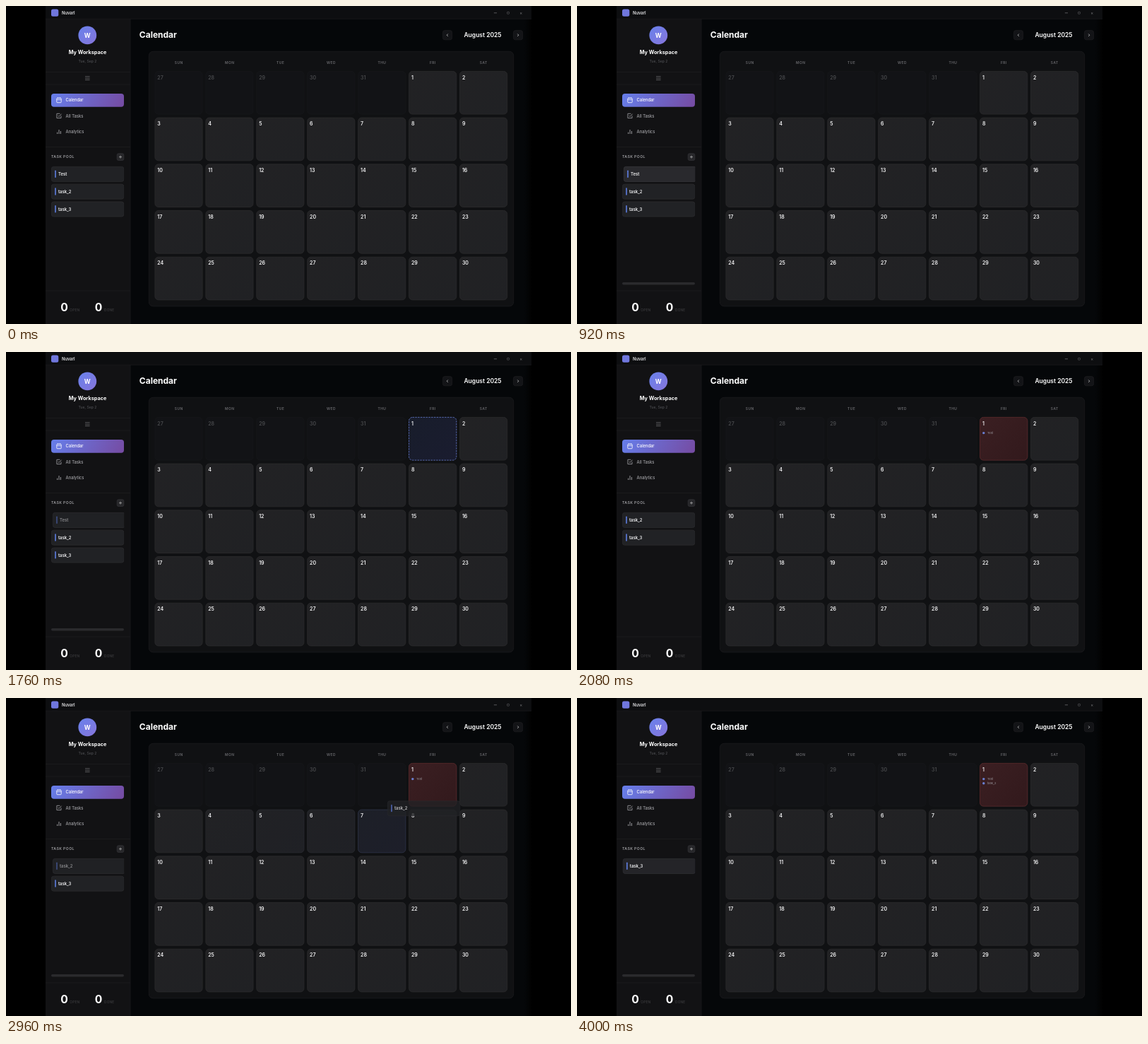
These frames come from a looping animation (800 by 450 pixels, 4.04 s). An HTML page with a canvas:

```html
<!DOCTYPE html>
<html lang="en">
<head>
<meta charset="utf-8">
<title>Calendar</title>
<style>
html, body { margin: 0; width: 100%; height: 100%; overflow: hidden; background: #000; }
canvas { display: block; width: 800px; height: 450px; }
</style>
</head>
<body>
<canvas width="800" height="450"></canvas>
<script>
const ctx = document.querySelector('canvas').getContext('2d');
const LOOP = 4040, FADE = 180;
const DAYS = ['SUN', 'MON', 'TUE', 'WED', 'THU', 'FRI', 'SAT'];
const TARGET = 5;

// Each drag: pointer path [ms, x, y], ghost offset, and the times of its stages.
const drags = [
  { name: 'Test', hover: 520, start: 1000, hide: 1720, leave: 1800, save: 1880, grab: 22,
    path: [[1000, 88, 238], [1160, 530, 170], [1320, 568, 156], [1480, 577, 128]] },
  { name: 'task_2', hover: 2300, start: 2680, hide: 3270, leave: 3290, save: 3420, grab: 36,
    path: [[2680, 100, 238], [2900, 560, 160], [3120, 645, 130], [3240, 612, 125]] },
  { name: 'task_3', hover: 3910, start: LOOP, save: LOOP }
];

const clamp = v => Math.max(0, Math.min(1, v));
const smooth = v => v * v * (3 - 2 * v);
const ramp = (t, from, length = 200) => smooth(clamp((t - from) / length));

function pointer(drag, t) {
  let [, x, y] = drag.path[0];
  for (let i = 1; i < drag.path.length; i++) {
    const [t0, x0, y0] = drag.path[i - 1], [t1, x1, y1] = drag.path[i];
    if (t >= t0) {
      const p = ramp(t, t0, t1 - t0);
      x = x0 + (x1 - x0) * p;
      y = y0 + (y1 - y0) * p;
    }
  }
  return [x, y];
}

const cellX = i => 210.5 + 71.93 * (i % 7);
const cellY = i => 92 + 65.7 * Math.floor(i / 7);

function cellUnder(t) {
  const drag = drags.find(d => d.path && t >= d.start && t < d.leave);
  if (!drag) return -1;
  const [x, y] = pointer(drag, t);
  for (let i = 0; i < 35; i++) {
    const dx = x - cellX(i), dy = y - cellY(i);
    if (dx >= 0 && dx <= 68 && dy >= 0 && dy <= 61.5) return i;
  }
  return -1;
}

function box(x, y, w, h, r, fill, stroke) {
  ctx.beginPath();
  ctx.roundRect(x, y, w, h, r);
  if (fill) { ctx.fillStyle = fill; ctx.fill(); }
  if (stroke) { ctx.strokeStyle = stroke; ctx.stroke(); }
}

function dot(x, y, r, fill) {
  ctx.beginPath();
  ctx.arc(x, y, r, 0, 7);
  ctx.fillStyle = fill;
  ctx.fill();
}

function text(str, x, y, size, color, weight = 500, align = 'left', spacing = 0) {
  ctx.font = `${weight} ${size}px Inter, sans-serif`;
  ctx.letterSpacing = spacing + 'px';
  ctx.textAlign = align;
  ctx.fillStyle = color;
  ctx.fillText(str, x, y);
}

function line(color, width, ...points) {
  ctx.beginPath();
  points.forEach(([x, y], i) => i ? ctx.lineTo(x, y) : ctx.moveTo(x, y));
  ctx.strokeStyle = color;
  ctx.lineWidth = width;
  ctx.stroke();
  ctx.lineWidth = .8;
}

function gradient(x0, y0, x1, y1, a, b) {
  const g = ctx.createLinearGradient(x0, y0, x1, y1);
  g.addColorStop(0, a);
  g.addColorStop(1, b);
  return g;
}

function withAlpha(alpha, draw) {
  ctx.save();
  ctx.globalAlpha *= alpha;
  draw();
  ctx.restore();
}

function taskCard(name, x, y, hover = 0) {
  box(x + .4, y + .4, 102.4, 21, 3, '#212225', '#2b2b2e');
  if (hover) withAlpha(hover, () => box(x + .4, y + .4, 102.4, 21, 3, '#29292d', '#343438'));
  box(x + 5.2, y + 5.5, 1.6, 10.5, .8, '#5f7fe4');
  text(name, x + 10, y + 13, 5.9, '#f1f1f3', 600);
}

function drawFrame() {
  ctx.fillStyle = '#000';
  ctx.fillRect(0, 0, 800, 450);
  ctx.fillStyle = '#050709';
  ctx.fillRect(56, 0, 680, 450);
  ctx.fillStyle = gradient(734, 0, 744, 0, '#050709', '#010101');
  ctx.fillRect(734, 0, 10, 450);
  ctx.fillStyle = '#121214';
  ctx.fillRect(56, 18, 120, 432);
  ctx.fillStyle = '#0d0e10';
  ctx.fillRect(56, 0, 688, 18);
  line('#1a1a1c', .8, [56, 18.3], [744, 18.3]);
  line('#1a1a1c', .8, [176, 18], [176, 450]);

  box(64, 4.5, 10.3, 10.3, 2.5, '#7077dd');
  text('Nuvarl', 79, 11.8, 5.8, '#e4e4e6', 600);
  line('#77777a', .7, [690.8, 9.8], [695, 9.8]);
  box(709.6, 8.4, 2.8, 2.8, .4, null, '#4f4f52');
  text('×', 729.3, 11.7, 6, '#77777a', 400, 'center');
}

function drawSidebar(t) {
  dot(115.3, 41.4, 12.9, gradient(105, 31, 126, 52, '#6b80ea', '#8476dc'));
  text('W', 115.3, 44.5, 8.6, '#fff', 700, 'center');
  text('My Workspace', 115.5, 67.6, 7.3, '#fff', 700, 'center');
  text('Tue, Sep 2', 115.5, 80.4, 5.15, '#56575b', 400, 'center');
  for (const y of [93.5, 111, 199.5, 403]) line('#1d1d1f', .8, [56, y], [176, y]);
  for (const y of [99.8, 102.2, 104.6]) line('#77777a', .7, [112, y], [118.6, y]);

  box(64, 124, 103, 18.8, 4, gradient(72, 110, 159, 157, '#667eea', '#764ba2'));
  const gray = '#a5a5a9';
  text('Calendar', 84.6, 135.1, 5.8, '#fff');
  text('All Tasks', 84.6, 157.5, 5.8, gray);
  text('Analytics', 84.6, 179.9, 5.8, gray);
  box(71.8, 130.3, 6.4, 6.4, .8, null, '#fff');
  line('#fff', .7, [71.8, 132.6], [78.2, 132.6]);
  line('#fff', .7, [73.6, 129.3], [73.6, 131]);
  line('#fff', .7, [76.4, 129.3], [76.4, 131]);
  line(gray, .8, [78, 155.4], [78, 158.6], [71.9, 158.6], [71.9, 152.3], [76.4, 152.3]);
  line(gray, .8, [73.6, 155], [75, 156.5], [78.5, 152.7]);
  [[72.6, 178.7], [75, 175], [77.4, 177]].forEach(([x, y]) => line(gray, .9, [x, 181], [x, y]));

  text('TASK POOL', 64, 215.4, 5.2, '#a0a0a4', 600, 'left', .4);
  box(157.2, 208.8, 9.6, 9.6, 2, '#27272a', '#333336');
  line('#bbb', .7, [160, 213.6], [164, 213.6]);
  line('#bbb', .7, [162, 211.6], [162, 215.6]);

  ctx.save();
  ctx.beginPath();
  ctx.rect(63.5, 224, 103.7, 172);
  ctx.clip();
  drags.filter(d => t < d.save).forEach((d, i) => {
    const hover = ramp(t, d.hover);
    withAlpha(1 - .5 * ramp(t, d.start, 80), () =>
      taskCard(d.name, 64 + 2 * hover, 227 + 24.8 * i, hover));
  });
  ctx.restore();
  if (drags.some(d => t >= d.hover && t < d.save)) box(64, 391, 103, 3.5, 1.75, '#2a2a2d');

  text('0', 77.3, 432, 15.7, '#fff', 700);
  text('OPEN', 90.3, 432, 4.8, '#3b3b3e', 500, 'left', .2);
  text('0', 125.8, 432, 15.7, '#fff', 700);
  text('DONE', 139, 432, 4.8, '#3b3b3e', 500, 'left', .2);
}

function drawCell(i, glow, dashed, red) {
  const x = cellX(i), y = cellY(i), muted = i < 5;
  const shape = (fill, stroke) => box(x + .4, y + .4, 67.2, 60.7, 5, fill, stroke);
  shape(muted ? '#121316' : gradient(x, y, x + 68, y + 61, '#222224', '#202124'),
        muted ? '#17181b' : '#2b2b2d');
  if (red) withAlpha(red, () =>
    shape(gradient(x, y, x + 68, y + 61, '#3b1f22', '#32191c'), '#5a2629'));
  if (glow) {
    withAlpha(glow, () => shape(gradient(x, y, x + 68, y + 61, '#181d2b', '#1a1c2f')));
    withAlpha(dashed ? glow : glow * .45, () => {
      if (dashed) ctx.setLineDash([2.4, 1.4]);
      shape(null, dashed ? '#6077d0' : '#4b62a8');
    });
  }
  text((i + 26) % 31 + 1, x + 3.8, y + 11.6, 7, muted ? '#48494c' : '#f4f4f5', 600);
}

function drawCalendar(t) {
  text('Calendar', 188.8, 45.4, 12, '#fff', 700);
  text('August 2025', 675, 44.2, 8.5, '#fff', 600, 'center');
  for (const [x, dir] of [[625, -1], [725, 1]]) {
    box(x - 6.6, 34.6, 13.2, 13.2, 3, '#131417', '#1d1d20');
    line('#c8c8ca', .8, [x - .8 * dir, 39.5], [x + .8 * dir, 41.2], [x - .8 * dir, 42.9]);
  }
  box(202.3, 64.3, 516.4, 360.6, 6, '#101113', '#1b1b1d');
  DAYS.forEach((day, i) =>
    text(day, cellX(i) + 34.2, 81.7, 4.9, '#69696d', 600, 'center', .5));

  // A moving average of the pointer's stay gives each cell its fade in and out.
  const glow = {}, steps = 18;
  for (let k = 0; k < steps; k++) {
    const i = cellUnder(t - k * FADE / steps);
    glow[i] = (glow[i] || 0) + 1 / steps;
  }
  const active = cellUnder(t);
  for (let i = 0; i < 35; i++) {
    const red = i === TARGET && t < 2700 + 480 ? ramp(t, drags[0].save)
      : i === TARGET ? 1 : 0;
    drawCell(i, glow[i] || 0, i === active, red * redVisible(t));
  }
  drags.filter(d => t >= d.save).forEach((d, i) => {
    const y = 114.6 + 6.2 * i;
    dot(575.8, y, 1.7, '#6a80d4');
    text(d.name, 581, y + 1.4, 4.1, '#9a969d', 400);
  });
}

// The red tint gives way while the second card is held over the cell.
function redVisible(t) {
  return 1 - ramp(t, 3150, 120) + ramp(t, drags[1].save);
}

function drawGhost(t) {
  const drag = drags.find(d => d.path && t >= d.start && t < d.hide);
  if (!drag) return;
  const [x, y] = pointer(drag, t);
  withAlpha(.75, () => taskCard(drag.name, x - drag.grab, y - 9));
}

function render() {
  const t = performance.now() % LOOP;
  ctx.lineWidth = .8;
  drawFrame();
  drawSidebar(t);
  drawCalendar(t);
  drawGhost(t);
  requestAnimationFrame(render);
}
render();
</script>
</body>
</html>
```
